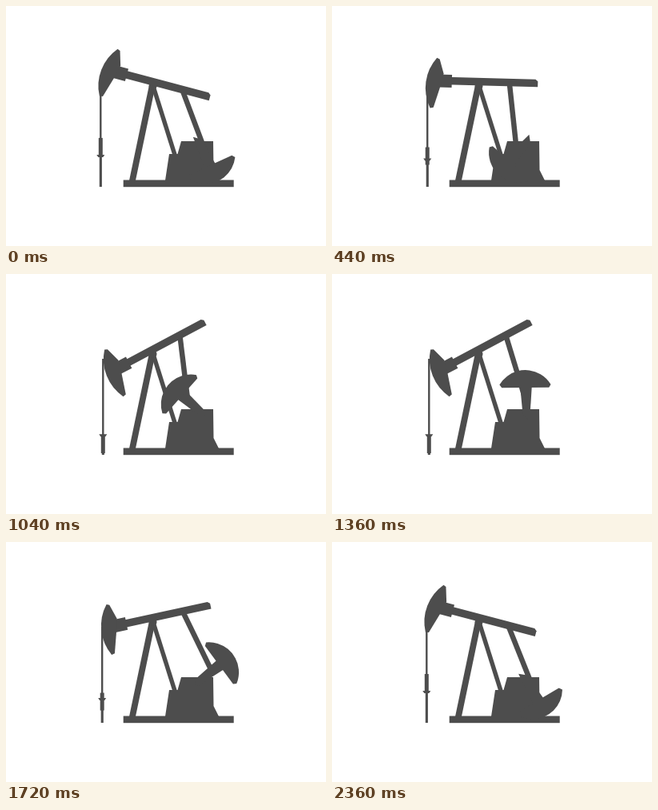
An HTML page with a canvas that plays this animation: 400 by 300 pixels, repeating every 2400 ms.

```html
<!DOCTYPE html>
<html lang="en">
<head>
<meta charset="utf-8">
<title>Pump jack</title>
<style>
  html, body { margin: 0; width: 100%; height: 100%; overflow: hidden; background: #fff; }
  canvas { display: block; width: 400px; height: 300px; }
</style>
</head>
<body>
<canvas id="stage" width="400" height="300"></canvas>
<script>
const ctx = document.getElementById('stage').getContext('2d');
const INK = '#4d4d4d';
const LOOP = 2400, STEP = 40;
const RAD = Math.PI / 180;

const pivot = { x: 183.3, y: 95 };
const crank = { x: 242.5, y: 172 };
const jointRadius = 38.5, pinRadius = 18.5;

function polygon(...points) {
  ctx.beginPath();
  points.forEach(([x, y]) => ctx.lineTo(x, y));
  ctx.fill();
}

// A circular arc (angles in degrees) closed through the given points.
function arcShape(x, y, radius, from, to, ...points) {
  ctx.beginPath();
  ctx.arc(x, y, radius, from * RAD, to * RAD);
  points.forEach(([px, py]) => ctx.lineTo(px, py));
  ctx.fill();
}

function strut(a, b, width) {
  ctx.lineWidth = width;
  ctx.beginPath();
  ctx.moveTo(a.x, a.y);
  ctx.lineTo(b.x, b.y);
  ctx.stroke();
}

function bar(x, top, bottom, width) {
  ctx.fillRect(x - width / 2, top, width, bottom - top);
}

function polar(origin, radius, angle) {
  return {
    x: origin.x + radius * Math.cos(angle),
    y: origin.y + radius * Math.sin(angle)
  };
}

function rotated(origin, angle, draw) {
  ctx.save();
  ctx.translate(origin.x, origin.y);
  ctx.rotate(angle);
  draw();
  ctx.restore();
}

function drawFrame() {
  ctx.fillRect(146.7, 217.5, 138, 8.7);
  strut({ x: 182.5, y: 101 }, { x: 157.6, y: 220 }, 7.8);
  strut({ x: 184.5, y: 102 }, { x: 211, y: 186 }, 5.5);
  arcShape(183.5, 100, 5, 0, 360);
  polygon([219, 169], [259, 169], [259.5, 205], [266, 218],
          [199, 218], [204, 185], [214.5, 185]);
}

function drawBeam() {
  polygon([-40, -5], [71, -5.5], [74, -3], [74, 4], [-40, 4.5]);
  ctx.fillRect(-50, -8, 16.5, 16);
  arcShape(-9.7, 7.8, 56.5, 152, 220, [-49.5, -27], [-44, -9], [-48, 8], [-55.5, 33.5]);
}

function drawCounterweight() {
  polygon([-11, 4.5], [-4, -4], [31, -7], [31, 7.5]);
  arcShape(14.5, -0.8, 37.4, -59, 59, [30, 29], [30, -30]);
}

function drawWellRod(beamAngle) {
  const drop = 15 - beamAngle / RAD;
  const x = 118.3 + drop * 0.07;
  const sleeve = 165 + drop * 0.873;
  const collar = 186 + drop * 0.333;
  bar(x, 106, 226, 2.4);
  bar(x, sleeve + 20, 226, 3);
  bar(x, sleeve, Math.min(sleeve + 22, 224), 5);
  polygon([x - 5, collar], [x + 5, collar], [x + 3, collar + 3], [x - 3, collar + 3]);
}

function render(time) {
  const t = Math.floor((time % LOOP) / STEP) * STEP;
  const turn = t / LOOP * 2 * Math.PI;
  const crankAngle = turn + 65.5 * RAD;
  const beamAngle = (-7.3 + 22.4 * Math.cos(turn)) * RAD;

  ctx.fillStyle = '#fff';
  ctx.fillRect(0, 0, 400, 300);
  ctx.fillStyle = ctx.strokeStyle = INK;

  drawWellRod(beamAngle);
  drawFrame();
  strut(polar(pivot, jointRadius, beamAngle),
        polar(crank, pinRadius, crankAngle - 5 * RAD), 6.5);
  rotated(pivot, beamAngle, drawBeam);
  rotated(crank, crankAngle, drawCounterweight);
}

const start = performance.now();
function tick() {
  render(performance.now() - start);
  requestAnimationFrame(tick);
}
tick();
</script>
</body>
</html>
```
